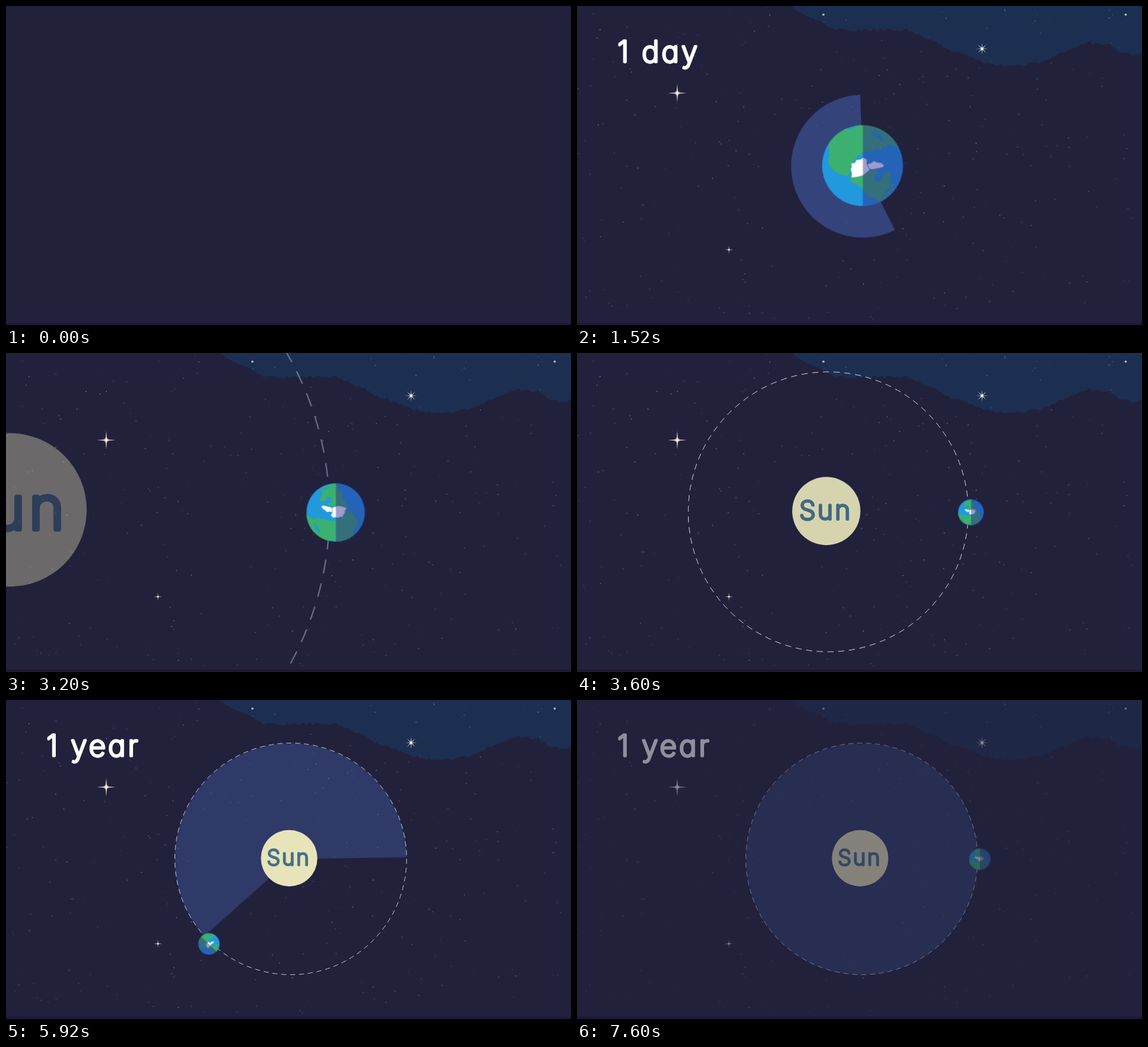
Animation, 885 px wide and 500 px high, one loop 7680 ms. Source, as an HTML page:

```html
<!DOCTYPE html>
<html lang="en">
<head>
<meta charset="utf-8">
<title>Day and year</title>
<style>
  html, body { margin: 0; width: 100%; height: 100%; overflow: hidden; background: #22213c; }
  svg { display: block; width: 885px; height: 500px; }

  .anim, .anim * { animation: 7.68s linear infinite; }
  .anim { animation-name: scene; }
  .ease { animation-timing-function: cubic-bezier(.333, 0, .667, 1) !important; }

  /* a thin face with a thick round outline gives rounded letters */
  .title, .sun text {
    font-family: Inter, "Open Sans", sans-serif;
    font-feature-settings: "cv11";
    font-weight: 200;
    stroke-linejoin: round;
  }
  .title { font-size: 46px; letter-spacing: 3.8px; fill: #fff; stroke: #fff; stroke-width: 3.6; }
  .sun text { font-size: 34px; letter-spacing: 2.5px; fill: #44708b; stroke: #44708b; stroke-width: 2.9; text-anchor: middle; }

  .day-title { animation-name: day-title; }
  .year-title { animation-name: year-title; }
  .day-disc { animation-name: day-disc; }
  .day-sweep { animation-name: day-sweep; }
  .year-sweep { animation-name: year-sweep; }
  .spin { animation-name: spin; }
  .zoom { animation-name: zoom; }
  .appear { animation-name: appear; }
  .orbit { animation-name: orbit; }

  .sweep { fill: none; stroke: #4866ba; stroke-dasharray: 361 361; }

  @keyframes scene {
    0% { opacity: 0; }
    10.417%, 93.75% { opacity: 1; }
    100% { opacity: .4; }
  }
  @keyframes day-title {
    0%, 36.458% { opacity: 1; }
    41.667%, 100% { opacity: 0; }
  }
  @keyframes year-title {
    0%, 63.8% { opacity: 0; }
    70.3%, 100% { opacity: 1; }
  }
  @keyframes day-disc {
    0%, 32.813% { opacity: .5; }
    38.542%, 100% { opacity: 0; }
  }
  @keyframes day-sweep {
    0%, 7.292% { stroke-dashoffset: 361; }
    29.349%, 100% { stroke-dashoffset: 0; }
  }
  @keyframes year-sweep {
    0%, 48.958% { stroke-dashoffset: 361; }
    97.917%, 100% { stroke-dashoffset: 0; }
  }
  @keyframes spin {
    0%, 7.292% { transform: rotate(0deg); }
    29.349%, 100% { transform: rotate(-360deg); }
  }
  @keyframes zoom {
    0%, 36.458% { transform: translate(447.3px, 250.2px) scale(3.757); }
    49%, 100% { transform: translate(631px, 249.5px) scale(1); }
  }
  @keyframes appear {
    0%, 36.458% { opacity: 0; }
    49%, 100% { opacity: 1; }
  }
  @keyframes orbit {
    0%, 48.958% { transform: rotate(0deg); }
    96.92%, 100% { transform: rotate(-360deg); }
  }
</style>
</head>
<body>
<svg viewBox="0 0 885 500">
  <defs>
    <clipPath id="globe"><circle r="63.5"/></clipPath>
    <radialGradient id="glow">
      <stop offset="0" stop-color="#fff"/>
      <stop offset="1" stop-color="#fff" stop-opacity="0"/>
    </radialGradient>
  </defs>
  <rect width="885" height="500" fill="#22213c"/>

  <g class="anim">
    <path id="nebula" fill="#1d2f50"/>
    <g id="stars" fill="#8f9cc0"></g>
    <g id="sparkles"></g>

    <text class="title day-title" x="63.5" y="88">1 day</text>
    <text class="title year-title" x="63.5" y="88">1 year</text>

    <g class="day-disc">
      <g transform="translate(447.5 251) rotate(-92) scale(1 -1)">
        <circle class="sweep day-sweep" r="56" stroke-width="112" pathLength="360"/>
      </g>
    </g>

    <!-- the solar system, measured from the earth's resting place -->
    <g class="zoom ease">
      <g transform="translate(-185 -.5)">
        <g transform="translate(0 .5) rotate(-1) scale(1 -1)" opacity=".36">
          <circle class="sweep year-sweep ease" r="90.75" stroke-width="181.5" pathLength="360"/>
        </g>
        <g class="appear ease">
          <circle r="181.5" fill="none" stroke="#e4e6f0" stroke-width=".8" pathLength="1148" stroke-dasharray="8 6"/>
          <g class="sun" transform="translate(-2.5 -1)">
            <circle r="44.2" fill="#e7e4ba"/>
            <text x="-.7" y="11.2">Sun</text>
          </g>
        </g>
        <g class="orbit ease">
          <g transform="translate(185 .5) scale(.2662)" clip-path="url(#globe)">
            <circle r="63.5" fill="#2199dc"/>
            <g class="spin">
              <g fill="#3cb06f">
                <path d="M-28 -54L-14 -60 0 -62 6 -52 14 -43 16 -30 22 -20 28 -15 24 -6 0 -12 -14 -14 -20 -19 -10 -22 -9 -31 -18 -34 -20 -28 -27 -23 -35 -25 -32 -34 -29 -42 -31 -47Z"/>
                <path d="M-64 2L-57 9 -53 10 -50 15 -46 10 -42 14 -36 10 -30 16 -26 14 -10 18 0 17 8 13 16 9 22 -3 28 -5 36 0 44 11 48 21 45 31 40 37 36 50 24 66 0 66 -6 59 -14 61 -40 62 -66 40Z"/>
              </g>
              <g fill="#2199dc">
                <path d="M-46 21L-42 25 -38 34 -33 40 -36 43 -43 36 -46 28Z"/>
                <path d="M-28 -50L-13 -57 -14 -54 -26 -47Z"/>
              </g>
              <g fill="#fff">
                <path d="M-31 -13L-28 -15 -18 -13 -10 -11 -8 -8 -8 -1 -13 -2 -19 -1 -24 -6 -27 -7Z"/>
                <path d="M-7 -11L-1 -12 5 -14 13 -13 23 -10 20 -3 19 3 16 5 15 10 9 9 5 12 -1 10 -6 11 -10 6 -7 0Z"/>
              </g>
            </g>
            <rect x=".5" y="-64" width="64" height="128" fill="#2c238c" opacity=".45"/>
          </g>
        </g>
      </g>
    </g>
  </g>
  <rect y="496" width="885" height="4" fill="#20193a"/>
</svg>

<script>
  const byId = id => document.getElementById(id);

  let seed = 41;
  const rand = () => (seed = (seed * 16807) % 2147483647) / 2147483647;

  // Ragged lower edge of the nebula through a few points
  const edge = [[333, 0], [360, 14], [385, 27], [402, 36], [430, 39], [460, 37], [490, 37],
    [517, 37], [535, 45], [566, 58], [574, 66], [608, 76], [632, 87], [655, 92], [690, 94],
    [728, 88], [752, 76], [776, 66], [800, 57], [836, 62], [850, 71], [872, 78], [885, 74]];
  let outline = "M333 0";
  for (let i = 1; i < edge.length; i++) {
    const [x0, y0] = edge[i - 1], [x1, y1] = edge[i];
    const steps = Math.ceil((x1 - x0) / 4);
    for (let s = 1; s <= steps; s++) {
      const u = s / steps;
      outline += `L${x0 + (x1 - x0) * u} ${y0 + (y1 - y0) * u + (rand() - .5) * 4}`;
    }
  }
  byId("nebula").setAttribute("d", outline + "V0Z");

  // Faint dust of stars
  let dots = "";
  for (let i = 0; i < 290; i++) {
    const x = rand() * 885, y = rand() * 492;
    dots += `<circle cx="${x}" cy="${y}" r="${.45 + rand() * .4}" opacity="${.35 + rand() * .5}"/>`;
  }
  byId("stars").innerHTML = dots;

  // Pointed stars: alternating long and short radii
  function sparkle(x, y, points, long, short, color) {
    const corners = Array.from({ length: points * 2 }, (_, i) => {
      const a = i * Math.PI / points, r = i % 2 ? short : long;
      return `${x + r * Math.sin(a)},${y - r * Math.cos(a)}`;
    });
    return `<polygon points="${corners.join(" ")}" fill="${color}"/>` +
      `<circle cx="${x}" cy="${y}" r="${long * .32}" fill="url(#glow)"/>`;
  }
  const dot = (x, y) => `<circle cx="${x}" cy="${y}" r="1.8" fill="#a9b8cc"/>`;
  byId("sparkles").innerHTML =
    sparkle(157, 136.5, 4, 14.5, 1.5, "#f3e6cc") +
    sparkle(238, 382, 4, 6.5, .9, "#b9b3a8") +
    sparkle(634.5, 67, 8, 9.5, 1.5, "#cdd6e2") +
    dot(386, 13.5) + dot(859.5, 13.5);
</script>
</body>
</html>
```
